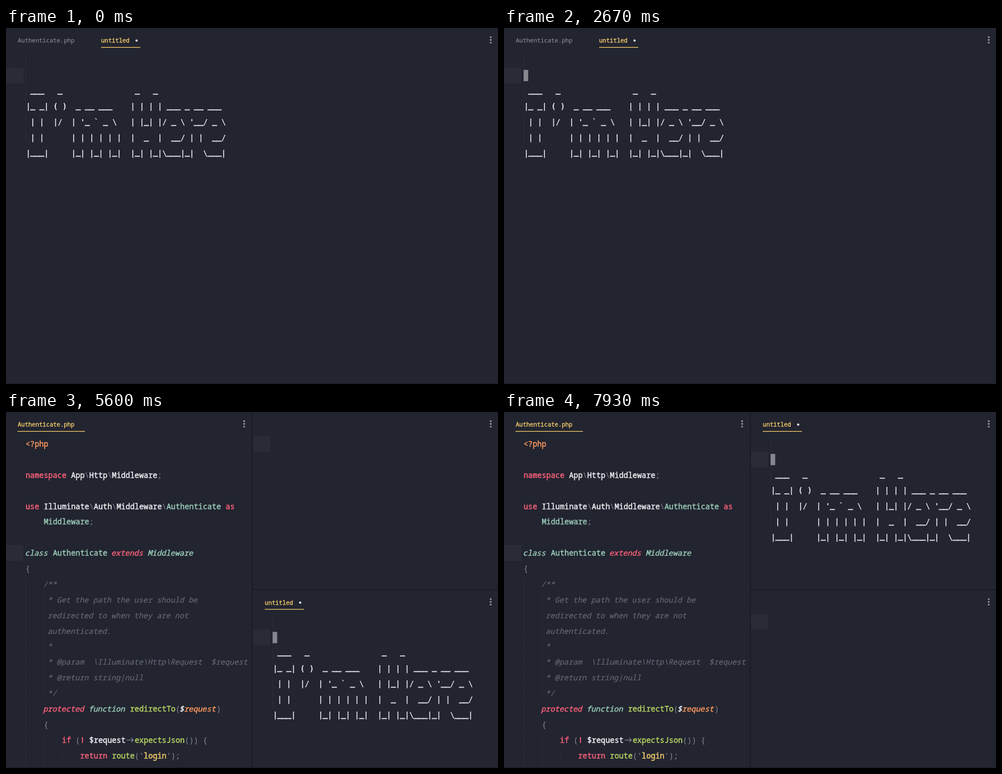
These frames come from a looping animation (879 px wide and 637 px high, 8 s). An HTML page:

```html
<!DOCTYPE html>
<html lang="en">
<head>
<meta charset="utf-8">
<title>Editor panes</title>
<style>
  html, body { margin: 0; width: 100%; height: 100%; overflow: hidden; background: #222430; }
  #stage { display: block; width: 879px; height: 637px; }
  text { white-space: pre; font: 13.54px "Noto Sans Mono", "DejaVu Sans Mono", monospace; fill: #888b94; }
  .tab { font-size: 10.55px; fill: #83858d; stroke: #83858d; stroke-width: .2px; }
  .tab.on { fill: #fbd26c; stroke: #fbd26c; stroke-width: .3px; }
  .p, .P { --ink: #fb617a; }
  .o, .O { --ink: #fd9a5f; }
  .w, .W { --ink: #eef1f2; }
  .g, .T { --ink: #9accb8; }
  .f { --ink: #b8d562; }
  .y { --ink: #fbd26c; }
  .c { --ink: #666974; }
  /* A thin outline gives the medium weight between regular and bold. */
  .token { fill: var(--ink); stroke: var(--ink); stroke-width: .45px; }
  .c { stroke-width: .15px; }
  .c, .P, .T, .O, .W { font-style: italic; }
  .art { font: bold 13.49px "DejaVu Sans Mono", monospace; fill: #eef1f2; }
  .under { font-weight: normal; stroke: #eef1f2; stroke-width: 1.1px; }
  .dot { fill: #eef1f2; }
  .row { fill: #292b37; }
  .guide { fill: #2b2d39; }
  .menu { fill: #96989f; }
  .line { fill: #fbd26c; }
  .edge { fill: #191a23; }
  .arrow { fill: none; stroke: #888b94; stroke-width: 1.2; }
  .caret { fill: #86878f; animation: blink 8s linear infinite; }
  .scene { visibility: hidden; animation: 8s step-end infinite; }
  #full { animation-name: full; }
  #code { animation-name: code; }
  #split { animation-name: split; }
  #low { animation-name: low; }
  #left { animation-name: left; }
  #top { animation-name: top; }

  @keyframes full {
    0%, 32.5% { visibility: visible; }
    21.625%, 55.875% { visibility: hidden; }
  }
  @keyframes code  { 0%, 32.5% { visibility: hidden; } 21.625% { visibility: visible; } }
  @keyframes split { 0%, 66.625% { visibility: hidden; } 55.875% { visibility: visible; } }
  @keyframes low   { 0%, 77.5% { visibility: hidden; } 66.625% { visibility: visible; } }
  @keyframes left  { 0%, 95.875% { visibility: hidden; } 77.5% { visibility: visible; } }
  @keyframes top   { 0% { visibility: hidden; } 95.875% { visibility: visible; } }

  /* The caret rests, fades over about 460 ms, and restarts on every pane switch. */
  @keyframes blink {
    0%, 9.999% { opacity: 0; }
    10%, 12.54% { opacity: .13; }
    17.5%, 28.375% { opacity: 1; }
    32.499% { opacity: .36; }
    32.5%, 45.04% { opacity: 1; }
    51.625%, 55.874% { opacity: .13; }
    55.875%, 62.625% { opacity: 1; }
    66.624% { opacity: .36; }
    66.625%, 73.375% { opacity: 1; }
    77.499% { opacity: .36; }
    77.5%, 84.25% { opacity: 1; }
    90%, 95.874% { opacity: .13; }
    95.875%, 100% { opacity: 1; }
  }
</style>
</head>
<body>
<svg id="stage" viewBox="0 0 879 637"></svg>

<script type="text/plain" id="php">
«o<?php»

«pnamespace» «wApp»\«wHttp»\«wMiddleware»;

«puse» «wIlluminate»\«wAuth»\«wMiddleware»\«gAuthenticate» «pas» «gMiddleware»;

«Tclass» «gAuthenticate» «Pextends» «TMiddleware»
{
    «c/**»
     «c* Get the path the user should be redirected to when they are not authenticated.»
     «c*»
     «c* @param  \Illuminate\Http\Request  $request»
     «c* @return string|null»
     «c*/»
    «Pprotected» «Tfunction» «fredirectTo»(«W$»«Orequest»)
    {
        «pif» («p!» «w$request»->«fexpectsJson»()) {
            «preturn» «froute»('«ylogin»');
        }
    }
}
</script>
<script type="text/plain" id="banner">
 ___   _                _   _
|_ _| ( )  _ __ ___    | | | | ___ _ __ ___
 | |  |/  | '_ ` _ \   | |_| |/ _ \ '__/ _ \
 | |      | | | | | |  |  _  |  __/ | |  __/
|___|     |_| |_| |_|  |_| |_|\___|_|  \___|
</script>

<script>
const COL = 8.12, ROW = 27.87, LEFT = 35, TOP = 57.5;
const linesOf = id => document.getElementById(id).textContent.replace(/^\n|\n$/g, '').split('\n');
const esc = s => s.replace(/&/g, '&amp;').replace(/</g, '&lt;');
const rect = (cls, x, y, w, h) => `<rect class="${cls}" x="${x}" y="${y}" width="${w}" height="${h}"/>`;
const text = (cls, x, y, s) => `<text class="${cls}" x="${x}" y="${y}">${s}</text>`;
const rowY = i => TOP + ROW * i;
const colX = c => LEFT + COL * c;

const wide = linesOf('php');
// Soft-wrapped lines; the no-break spaces keep indent guides off the wrapped import.
const narrow = wide.join('\n')
  .replace(' «gMiddleware»;', '\n' + '\u00a0'.repeat(4) + '«gMiddleware»;')
  .replace(' redirected', '»\n     «credirected')
  .replace(' authenticated.', '»\n     «cauthenticated.')
  .split('\n');
const banner = [' ', ' ', ...linesOf('banner')];

const guides = lines => lines.map((line, i) => {
  const indent = line.match(/^ */)[0].length;
  let out = '';
  for (let c = 0; c < indent; c += 4) out += rect('guide', colX(c), rowY(i - .5), 1, ROW);
  return out;
}).join('');

const gutter = row => rect('row', 0, rowY(row - .5) - .5, 31, 28);
const caret = (col, row) => rect('caret', colX(col), rowY(row) - 10.4, 8.2, 20.2);
const arrow = (x, y) => `<path class="arrow" d="M${x + 2} ${y}h12m-4-3.8l4 3.8-4 3.8"/>`;

// Each token sits on its own column; italics lean back a little.
function codeLine(line, i) {
  let col = 0, out = '';
  for (const part of line.match(/«.*?»|->|[^«]+?(?=->|«|$)/g) || []) {
    const marked = part[0] === '«';
    const body = marked ? part.slice(2, -1) : part;
    const kind = marked ? part[1] : '';
    const x = colX(col) - (/[cPTOW]/.test(kind) ? 1.3 : 0);
    out += part === '->' ? arrow(x, rowY(i))
      : text(marked ? 'token ' + kind : '', x, rowY(i) + 4.6, esc(body));
    col += body.length;
  }
  return out;
}

const codeView = (lines, row) => gutter(row) + guides(lines) + lines.map(codeLine).join('');

const bannerView = () => gutter(1) + guides(banner) + banner.map((line, i) =>
  text('art', LEFT + .7, rowY(i) + 3.9, esc(line.replace(/_/g, ' '))) +
  text('art under', LEFT + .7, rowY(i) + 1.7, line.replace(/[^_]/g, ' '))
).join('') + caret(0, 1);

const phpTab = on => text('tab' + (on ? ' on' : ''), 21, 26, 'Authenticate.php') +
  (on ? rect('line', 20.5, 34, 120.5, 1.2) : '');
const newTab = (x, on) => text('tab' + (on ? ' on' : ''), x, 26, 'untitled') +
  `<circle class="dot" cx="${x + 63.3}" cy="22.6" r="2"/>` +
  (on ? rect('line', x, 34, 70, 1.2) : '');
const closeMark = text('tab on', 131, 26, '×');

function pane(x, y, w, h, body) {
  const menu = [16.3, 21.2, 26.1].map(cy =>
    `<circle class="menu" cx="${w - 13}" cy="${cy}" r="1.6"/>`).join('');
  return `<svg x="${x}" y="${y}" width="${w}" height="${h}">${body}${menu}</svg>`;
}
const whole = body => pane(0, 0, 879, 637, body);
const leftPane = body => pane(0, 0, 438.5, 637, body);
const rightPane = body => pane(441.3, 0, 437.7, 637, body);
const upper = body => pane(441.3, 0, 437.7, 318, body);
const lower = body => pane(441.3, 318.5, 437.7, 318.5, body);
const column = rect('edge', 439.3, 0, 1.6, 637);
const cross = column + rect('edge', 440, 317.2, 439, 1.6);

const empty = gutter(0);
const loneBanner = newTab(21, true) + bannerView();
const tabbedBanner = phpTab(false) + newTab(170, true) + bannerView();
const narrowCode = phpTab(true) + codeView(narrow, 7);

const scenes = {
  full: whole(tabbedBanner),
  code: whole(phpTab(true) + closeMark + newTab(170, false) + codeView(wide, 6) + caret(36, 6)),
  split: leftPane(narrowCode) + rightPane(loneBanner) + column,
  low: leftPane(narrowCode) + upper(empty) + lower(loneBanner) + cross,
  left: leftPane(tabbedBanner) + upper(empty) + lower(empty) + cross,
  top: leftPane(narrowCode) + upper(loneBanner) + lower(empty) + cross
};

document.getElementById('stage').innerHTML =
  Object.entries(scenes).map(([id, body]) => `<g class="scene" id="${id}">${body}</g>`).join('') +
  rect('edge', 0, 636, 879, 1);
</script>
</body>
</html>
```
